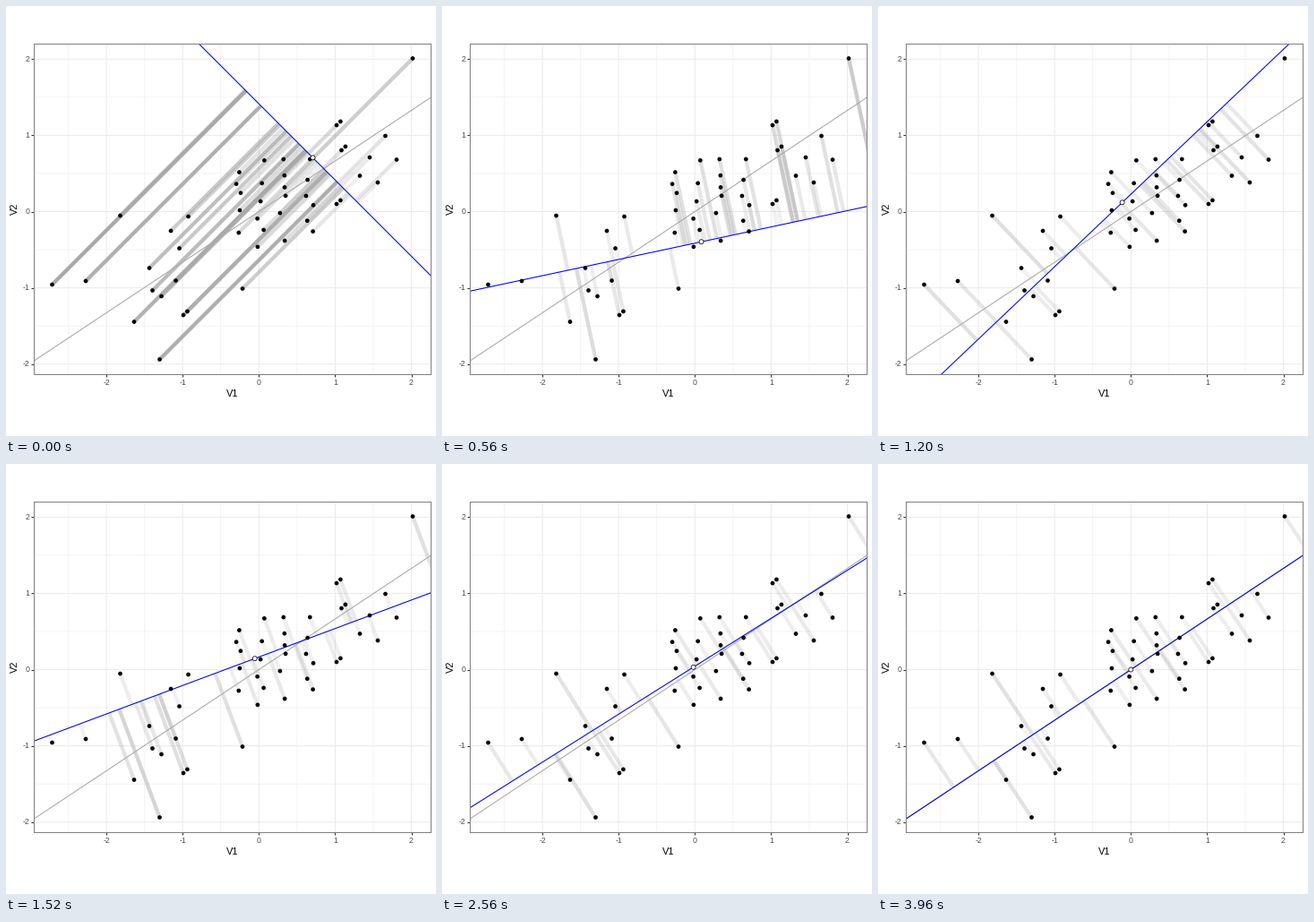
A matplotlib script for the animation above (4 s loop, 480 by 480 pixels).

```python
import numpy as np
import matplotlib.pyplot as plt
from matplotlib.animation import FuncAnimation
from matplotlib.collections import LineCollection, PatchCollection
from matplotlib.patches import Circle

SIZE, DPI = 480, 96
PX = 72 / DPI              # points per pixel
UNIT = 85.1                # pixels per data unit
ORIGIN = np.array([282.3, 229.5])
LEFT, RIGHT, TOP, BOTTOM = 31.4, 474.4, 42.1, 411.4
FRAMES, INTERVAL, SUBSTEPS = 100, 40, 2
REST = np.radians(33.57)   # direction of greatest spread
GRAY = 169 / 255

plt.rcParams["font.family"] = "Liberation Sans"


def crowd(count):
    """Evenly scattered dots of the central cloud, in stage pixels."""
    rng = np.random.default_rng(4)
    i = np.arange(1, count + 1)
    x = 252 + 104 * (i * 0.7549 % 1)
    y = 212 - 0.25 * (x - 302) + 100 * (i * 0.5698 % 1 - 0.5)
    return np.column_stack([x, y]) + rng.uniform(-5, 5, (count, 2))


# Key dots around the cloud, in stage pixels; each pair dot has a neighbour
single = np.array([
    (454, 58.5), (51.5, 311), (89, 307), (127.5, 234), (184, 251),
    (203.5, 235), (193.5, 270.5), (160, 292.5), (189.5, 306.5),
    (163.5, 317.5), (173.5, 324), (143, 352.5), (171.5, 394.5),
    (264, 315.5), (395, 189.5), (406, 169), (415, 197), (423.5, 145),
    (436, 171.5),
])
pair = np.array([(198, 345), (369, 133), (374.5, 161), (369, 221)])
dots = np.vstack([single, pair, pair + [4.4, -4.1], crowd(23)])
pts = (dots - ORIGIN) * [1, -1] / UNIT


def axes_of(angle):
    """Unit vectors along and across the rod."""
    c, s = np.cos(angle), np.sin(angle)
    return np.array([c, s]), np.array([-s, c])


def simulate():
    """Damped rod swinging to rest: (angle, offset) for every frame."""
    push, twist, damp = 0.00933, 0.00594, 0.9562
    angle, offset = -np.pi / 4, 1.0
    spin = speed = 0.0
    poses = []
    for _ in range(FRAMES - 1):
        poses.append((angle, offset))
        for _ in range(SUBSTEPS):
            spin = (spin + twist * np.sin(2 * (REST - angle))) * damp
            speed = (speed - push * offset) * damp
            angle += spin
            offset += speed
    return poses + [(REST, 0.0)]   # the loop ends at rest


poses = simulate()
longest = np.abs(pts @ axes_of(poses[0][0])[1] - poses[0][1]).max()

fig = plt.figure(figsize=(SIZE / DPI, SIZE / DPI), dpi=DPI, facecolor="white")
ax = fig.add_axes([LEFT / SIZE, 1 - BOTTOM / SIZE,
                   (RIGHT - LEFT) / SIZE, (BOTTOM - TOP) / SIZE])
ax.set_xlim((LEFT - ORIGIN[0]) / UNIT, (RIGHT - ORIGIN[0]) / UNIT)
ax.set_ylim((ORIGIN[1] - BOTTOM) / UNIT, (ORIGIN[1] - TOP) / UNIT)
ax.set_autoscale_on(False)
ticks = range(-2, 3)
ax.set_xticks(ticks, labels=[])
ax.set_yticks(ticks, labels=[])
ax.tick_params(length=2.74 * PX, width=1.07 * PX, color="0.2")
for spine in ax.spines.values():
    spine.set(edgecolor="0.5", linewidth=PX, zorder=9)

for value in np.arange(-2.5, 2.5, 0.5):
    width = 1.07 if value % 1 == 0 else 0.53
    for line in (ax.axvline, ax.axhline):
        line(value, color="0.92", lw=width * PX, zorder=0, snap=False)


def label(x, y, text, size, color, **kw):
    fig.text(x / SIZE, 1 - y / SIZE, text, fontsize=size * PX, color=color,
             va="baseline", **kw)


for k in ticks:
    label(ORIGIN[0] + k * UNIT, 422.8, str(k), 8.8, "0.3", ha="center")
    label(26.2, ORIGIN[1] - k * UNIT + 2.4, str(k), 8.8, "0.3", ha="right")
label(252.9, 436.5, "V1", 11, "black", ha="center")
label(13.4, 226, "V2", 11, "black", ha="center", rotation=90,
      rotation_mode="anchor")


def ends(angle, offset):
    u, n = axes_of(angle)
    return np.array([offset * n - 9 * u, offset * n + 9 * u]).T


ax.plot(*ends(REST, 0), color="darkgray", lw=1.07 * PX, zorder=1)
springs = LineCollection([], linewidths=4.27 * PX, capstyle="butt", zorder=2)
ax.add_collection(springs, autolim=False)
rod, = ax.plot([], [], color="blue", lw=1.07 * PX, zorder=3)
ax.add_collection(PatchCollection([Circle(p, 2.35 / UNIT) for p in pts],
                                  facecolor="black", linewidths=0, zorder=4))
hub = ax.add_patch(Circle((0, 0), 2.5 / UNIT, facecolor="white",
                          edgecolor="black", linewidth=0.75 * PX, zorder=5))


def draw(i):
    angle, offset = poses[i]
    _, n = axes_of(angle)
    gap = pts @ n - offset
    feet = pts - gap[:, None] * n
    alpha = np.clip(0.1 + 0.9 * np.abs(gap) / longest, 0, 1)
    springs.set_segments(np.stack([pts, feet], axis=1))
    springs.set_color([(GRAY, GRAY, GRAY, a) for a in alpha])
    rod.set_data(*ends(angle, offset))
    hub.center = offset * n
    return springs, rod, hub


anim = FuncAnimation(fig, draw, frames=FRAMES, interval=INTERVAL,
                     init_func=lambda: draw(0), repeat=True, repeat_delay=0)
plt.show()
```
